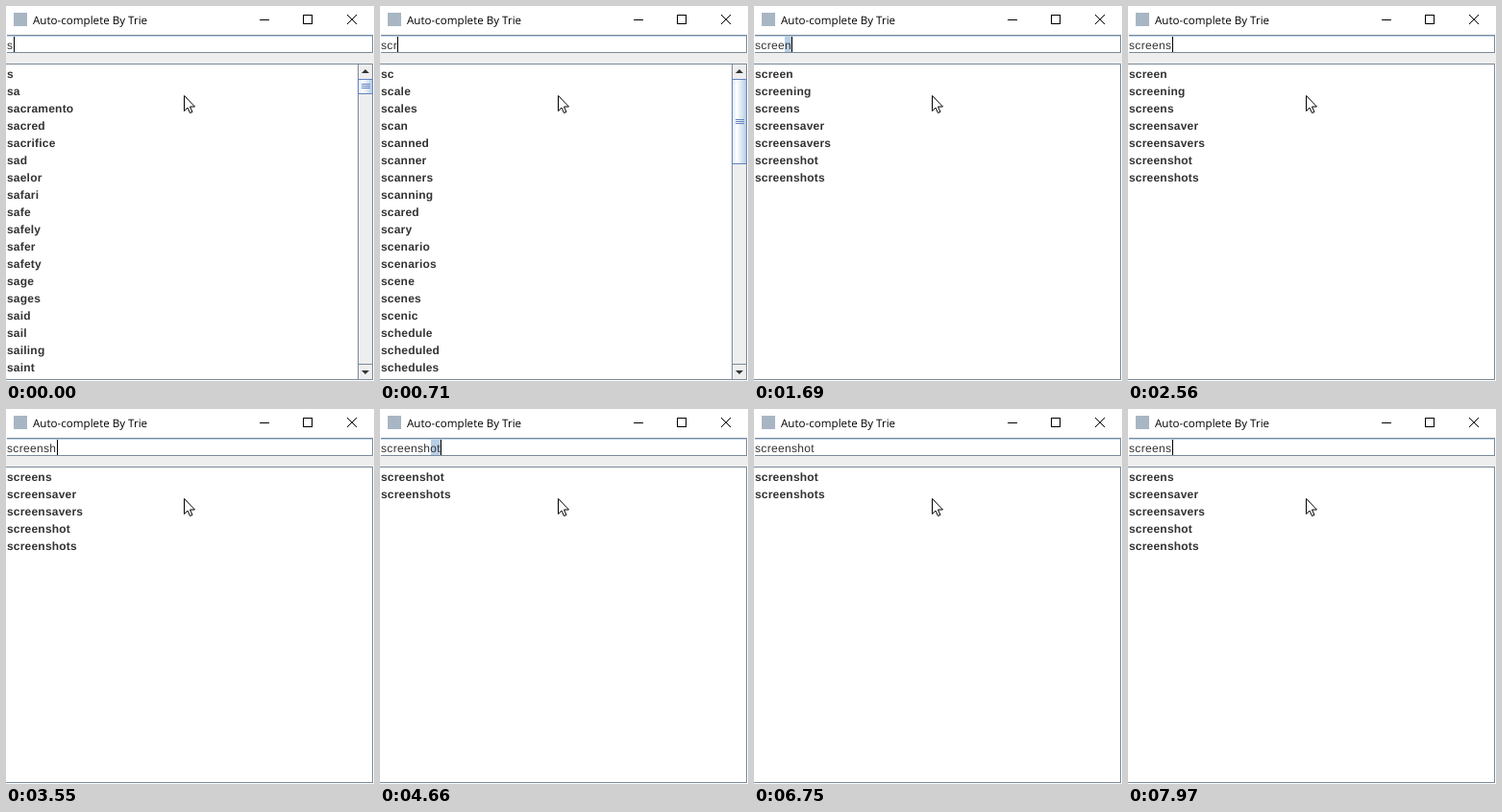
These frames come from a looping animation (383x391 px, 8 s). An HTML page with a canvas:

```html
<!DOCTYPE html>
<html lang="en">
<head>
<meta charset="utf-8">
<title>Auto-complete By Trie</title>
<style>
html, body { margin: 0; width: 100%; height: 100%; overflow: hidden; background: #fff; }
canvas { display: block; }
</style>
</head>
<body>
<canvas id="stage" width="383" height="391"></canvas>
<script>
const ctx = document.getElementById('stage').getContext('2d');
const LOOP = 8000, ROWS = 18, LINE = 18;
const EDGE = '#7a8a99', PANEL = '#eeeeee', SELECTED = '#b8cfe5', INK = '#333333';

const words = (
  's sa sacramento sacred sacrifice sad saelor safari safe safely safer safety sage sages said sail ' +
  'sailing saint sc scale scales scan scanned scanner scanners scanning scared scary scenario ' +
  'scenarios scene scenes scenic schedule scheduled schedules scratch screen screening screens ' +
  'screensaver screensavers screenshot screenshots screw script scripting scripts scroll'
).split(' ');

// Scrollbar thumb height for the prefixes whose matches overflow the list
const thumbs = { s: 15, sc: 88 };

// start time, typed text, suggested rest, prefix used by the list, caret visible
const steps = [
  [0, 's', '', 's', 1],
  [130, 'sc', '', 's', 1],
  [280, 'sc', '', 'sc', 1],
  [590, 'sc', '', 'sc', 0],
  [710, 'scr', '', 'sc', 1],
  [830, 'scr', 'atch', 'scr', 1],
  [1110, 'scre', 'en', 'scre', 1],
  [1690, 'scree', 'n', 'scree', 1],
  [2250, 'screen', '', 'screen', 1],
  [2560, 'screens', '', 'screen', 1],
  [2690, 'screens', '', 'screens', 1],
  [3280, 'screens', '', 'screens', 0],
  [3550, 'screensh', '', 'screens', 1],
  [3700, 'screensh', 'ot', 'screensh', 1],
  [4080, 'screensh', 'ot', 'screensh', 0],
  [4660, 'screensh', 'ot', 'screensh', 1],
  [5090, 'screensho', 't', 'screensh', 1],
  [5220, 'screenshot', '', 'screensh', 1],
  [5790, 'screenshot', '', 'screensh', 0],
  [6350, 'screenshot', '', 'screensh', 1],
  [6750, 'screenshot', '', 'screensh', 0],
  [7300, 'screenshot', '', 'screensh', 1],
  [7430, 'screensho', '', 'screensh', 1],
  [7570, 'screensh', '', 'screensh', 1],
  [7850, 'screens', '', 'screensh', 1],
  [7970, 'screens', '', 'screens', 1]
];

function box(color, x, y, w, h) {
  ctx.fillStyle = color;
  ctx.fillRect(x, y, w, h);
}

function frame(color, x, y, w, h) {
  ctx.strokeStyle = color;
  ctx.lineWidth = 1;
  ctx.strokeRect(x + .5, y + .5, w - 1, h - 1);
}

function shape(points, fill, stroke) {
  ctx.beginPath();
  for (let i = 0; i < points.length; i += 2) ctx.lineTo(points[i], points[i + 1]);
  ctx.closePath();
  ctx.fillStyle = fill;
  ctx.fill();
  if (stroke) {
    ctx.strokeStyle = stroke;
    ctx.lineWidth = 1;
    ctx.stroke();
  }
}

function setFont(font, spacing) {
  ctx.font = font;
  ctx.letterSpacing = spacing + 'px';
  ctx.textRendering = 'geometricPrecision';
}

function drawTitleBar() {
  box('#a8b6c4', 8, 7, 14, 14);
  setFont('11.6px "Open Sans", "Noto Sans", sans-serif', 0);
  ctx.fillStyle = '#000';
  ctx.fillText('Auto-complete By Trie', 28, 19);
  box('#000', 264, 14, 10, 1);
  frame('#000', 309, 9, 10, 10);
  ctx.strokeStyle = '#000';
  ctx.beginPath();
  ctx.moveTo(355, 9);
  ctx.lineTo(365, 19);
  ctx.moveTo(365, 9);
  ctx.lineTo(355, 19);
  ctx.stroke();
}

function drawField(typed, rest, caret) {
  box(EDGE, 1, 30, 381, 1);
  box(SELECTED, 1, 31, 380, 1);
  box(EDGE, 381, 30, 1, 19);
  box(EDGE, 1, 48, 381, 1);
  setFont('12px "Liberation Sans", Arial, sans-serif', .333);
  const xAfter = text => Math.round(1.2 + ctx.measureText(text).width);
  const from = xAfter(typed), to = xAfter(typed + rest);
  box(SELECTED, from, 32, to - from, 16);
  ctx.fillStyle = INK;
  ctx.fillText(typed + rest, 1, 45);
  if (caret) box('#000', to, 32, 1, 16);
}

function drawScrollbar(height) {
  box(PANEL, 366, 61, 15, 328);
  box(EDGE, 366, 61, 1, 328);
  box(EDGE, 366, 76, 15, 1);
  box(EDGE, 366, 373, 15, 1);
  shape([370, 70, 374, 66, 378, 70], INK);
  shape([370, 380, 378, 380, 374, 384], INK);
  const shade = ctx.createLinearGradient(367, 0, 381, 0);
  shade.addColorStop(0, '#dce8f4');
  shade.addColorStop(.3, '#ffffff');
  shade.addColorStop(1, SELECTED);
  box(shade, 366, 76, 16, height + 1);
  frame('#6382bf', 366, 76, 16, height + 1);
  const middle = 76 + Math.floor(height / 2);
  for (const dy of [-2, 0, 2]) box('#6382bf', 370, middle + dy, 9, 1);
}

function drawList(prefix) {
  box(PANEL, 0, 49, 383, 11);
  frame(EDGE, 0, 60, 382, 330);
  box('#fff', 0, 61, 1, 328);
  setFont('bold 12px "Liberation Sans", Arial, sans-serif', .2);
  ctx.fillStyle = INK;
  words.filter(word => word.startsWith(prefix)).slice(0, ROWS)
    .forEach((word, row) => ctx.fillText(word, 1, 75 + row * LINE));
  if (thumbs[prefix]) drawScrollbar(thumbs[prefix]);
}

function drawPointer() {
  shape([185.5, 93.5, 185.5, 109.5, 189, 106, 191.5, 111.5, 194, 110.5, 191.5, 105, 196.5, 105],
    '#fff', '#000');
}

function draw(now) {
  const time = now % LOOP;
  const [, typed, rest, prefix, caret] = steps.findLast(step => step[0] <= time);
  box('#fff', 0, 0, 383, 391);
  drawTitleBar();
  drawField(typed, rest, caret);
  drawList(prefix);
  drawPointer();
}

const start = performance.now();
function tick() {
  draw(performance.now() - start);
  requestAnimationFrame(tick);
}
tick();
</script>
</body>
</html>
```
